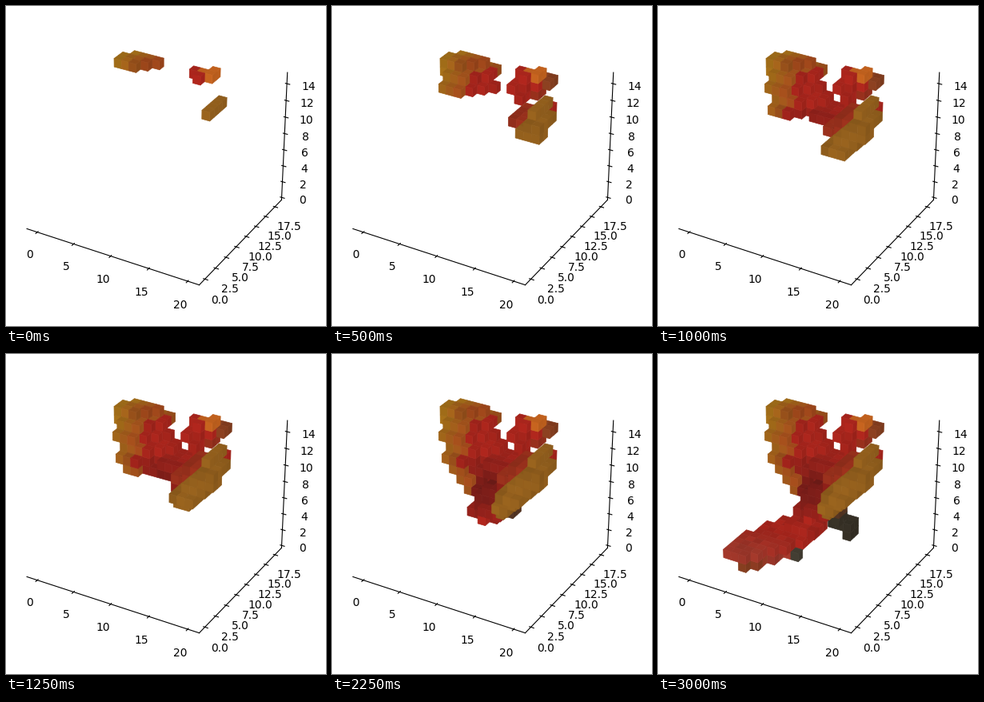
Animation of 400 by 400 pixels, one loop 3600 ms. Source, as a matplotlib script:

```python
import numpy as np
import matplotlib.pyplot as plt
from matplotlib.animation import FuncAnimation
from mpl_toolkits.mplot3d.art3d import Poly3DCollection

TOP, STAGES = 14, 13
STEP_MS, TICK_MS, LOOP_MS = 250, 50, 3600

GOLD = np.array([160, 108, 24]) / 255
BROWN = np.array([158, 84, 27]) / 255
UMBER = np.array([148, 96, 29]) / 255
ORANGE = np.array([196, 98, 30]) / 255
RED = np.array([170, 37, 28]) / 255
DARK = np.array([116, 28, 24]) / 255
EMBER = np.array([152, 48, 28]) / 255
ROSE = np.array([160, 55, 42]) / 255
RUST = np.array([138, 64, 32]) / 255
SOOT = np.array([56, 50, 39]) / 255

rng = np.random.default_rng(4)
cells = {}


def mix(a, b, t):
    return a + (b - a) * min(max(t, 0), 1)


def put(x, y, z, color):
    """Add one voxel unless the place is already taken."""
    if (x, y, z) not in cells:
        cells[x, y, z] = np.clip(color * rng.uniform(0.95, 1.05), 0, 1)


def box(z, y0, y1, x0, x1, color):
    for y in range(y0, y1):
        for x in range(x0, x1):
            put(x, y, z, color(x, y, z) if callable(color) else color)


def flesh(x, y, z):
    d2 = (x - 9.5) ** 2 + (y - 10) ** 2 + (z - 7.5) ** 2
    return mix(RED, DARK, 1.1 * np.exp(-d2 / 9))


def feather(v):
    if v < 2:
        return mix(GOLD, BROWN, v / 2)
    return mix(BROWN, RED, (v - 2) / 1.3 if v > 3 else (v - 2) / 4)


def left_wing():
    # z, first row, rows, left end, right end of the first row
    slabs = [(14, 13, 3, 2, 5), (13, 12, 5, 3, 6), (12, 11, 4, 3, 6),
             (11, 11, 4, 4, 8), (10, 10, 5, 4, 7), (9, 10, 4, 5, 7),
             (8, 10, 3, 6, 8), (7, 10, 3, 7, 9)]
    put(2, 13, 13, GOLD)
    for z, y0, rows, x0, x1 in slabs:
        for i in range(rows):
            start = x0 + i // 2
            for x in range(start, min(x1 + i, 8 if z > 12 else 10)):
                v = x - start + 0.3 * (TOP - z)
                color = feather(v)
                if z < 11 and v > 3:
                    color = flesh(x, y0 + i, z)
                put(x, y0 + i, z, color)


def right_wing():
    box(14, 7, 11, 17, 18, UMBER)
    box(13, 6, 10, 17, 19, UMBER)
    box(13, 10, 12, 17, 18, RED)
    box(12, 6, 8, 16, 19, UMBER)
    box(12, 8, 11, 16, 18, UMBER)
    box(12, 8, 12, 14, 16, EMBER)
    for z, y0 in zip((11, 10, 9, 8, 7), (6, 5, 6, 6, 7)):
        y1 = 9 if z == 11 else 10
        box(z, y0, y1, max(13, z + 4 + (z < 10)), z + 7, UMBER)
    box(11, 8, 11, 14, 17, EMBER)


def head():
    put(11, 15, 14, RED)
    put(12, 14, 14, RED)
    box(14, 15, 16, 12, 14, ORANGE)
    put(13, 16, 14, ORANGE)
    put(11, 13, 13, RED)
    box(13, 14, 15, 11, 13, RED)
    box(13, 15, 16, 11, 14, RED)
    box(13, 16, 18, 13, 15, RUST)
    put(12, 16, 13, RED)
    put(12, 13, 12, RED)
    put(12, 14, 12, RED)
    box(12, 15, 17, 12, 14, EMBER)
    put(12, 14, 11, RED)


def body():
    box(10, 11, 14, 9, 14, flesh)
    box(10, 14, 15, 10, 14, flesh)
    box(10, 9, 12, 12, 16, EMBER)
    box(9, 11, 14, 8, 14, flesh)
    box(9, 9, 11, 12, 15, flesh)
    box(8, 9, 13, 10, 14, flesh)
    box(7, 9, 12, 9, 13, flesh)
    box(6, 8, 11, 10, 13, flesh)
    put(9, 9, 6, flesh(9, 9, 6))
    box(5, 8, 9, 10, 11, RED)
    box(5, 9, 11, 8, 12, flesh)
    box(4, 7, 10, 8, 12, flesh)


def tail():
    for y in range(8):
        color = mix(ROSE, RED, (y - 1) / 5)
        box(3, y, y + 1, 4 + y // 5, min(11, 7 + (2 * y + 1) // 3), color)
    box(3, 8, 10, 6, 11, RED)
    put(10, 5, 2, SOOT + 0.05)
    for y in range(6):
        color = mix(RUST, ROSE, y / 3)
        box(2, y, y + 1, 6 + y // 2, 7 + (y + 1) // 2, color)


def feet():
    box(5, 11, 13, 12, 13, mix(SOOT, RUST, 0.4))
    box(4, 11, 13, 12, 13, SOOT)
    box(3, 12, 14, 11, 14, SOOT)
    box(2, 12, 14, 13, 14, SOOT)


# neighbour, corners and shade of the three sides turned to the viewer
SIDES = [((0, -1, 0), [(0, 0, 0), (1, 0, 0), (1, 0, 1), (0, 0, 1)], 1.0),
         ((1, 0, 0), [(1, 0, 0), (1, 1, 0), (1, 1, 1), (1, 0, 1)], 0.92),
         ((0, 0, 1), [(0, 0, 1), (1, 0, 1), (1, 1, 1), (0, 1, 1)], 0.95)]


def stage(floor):
    """All open faces of the voxels at or above the floor layer."""
    faces, colors = [], []
    for (x, y, z), color in cells.items():
        if z < floor:
            continue
        for (dx, dy, dz), corners, shade in SIDES:
            if (x + dx, y + dy, z + dz) not in cells or z + dz < floor:
                faces.append(np.array(corners) + (x, y, z))
                colors.append((*(color * shade), 1.0))
    return Poly3DCollection(faces, facecolors=colors, edgecolors=colors,
                            linewidths=0.5)


for part in (left_wing, right_wing, head, body, tail, feet):
    part()

fig = plt.figure(figsize=(4, 4), dpi=100, facecolor="white")
ax = fig.add_axes([-0.006, 0.071, 0.925, 0.925], projection="3d")
ax.patch.set_visible(False)
ax.view_init(elev=30, azim=-60)
ax.set_box_aspect((20, 18, 15))

stages = [stage(TOP - k) for k in range(STAGES)]
for s in stages:
    ax.add_collection3d(s)

ax.set_xlim(-1 - 22 / 48, 21 + 22 / 48)
ax.set_ylim(-0.9 - 19.8 / 48, 18.9 + 19.8 / 48)
ax.set_zlim(-15 / 48, 15 + 15 / 48)
ax.set_xticks(range(0, 21, 5))
ax.set_yticks(np.arange(0, 18, 2.5))
ax.set_zticks(range(0, 15, 2))
ax.grid(False)
for axis in (ax.xaxis, ax.yaxis, ax.zaxis):
    axis.pane.set_visible(False)


def update(i):
    k = min(i * TICK_MS // STEP_MS, STAGES - 1)
    for j, s in enumerate(stages):
        s.set_visible(j == k)
    return stages


anim = FuncAnimation(fig, update, frames=LOOP_MS // TICK_MS,
                     interval=TICK_MS, repeat=True, repeat_delay=0)
plt.show()
```
